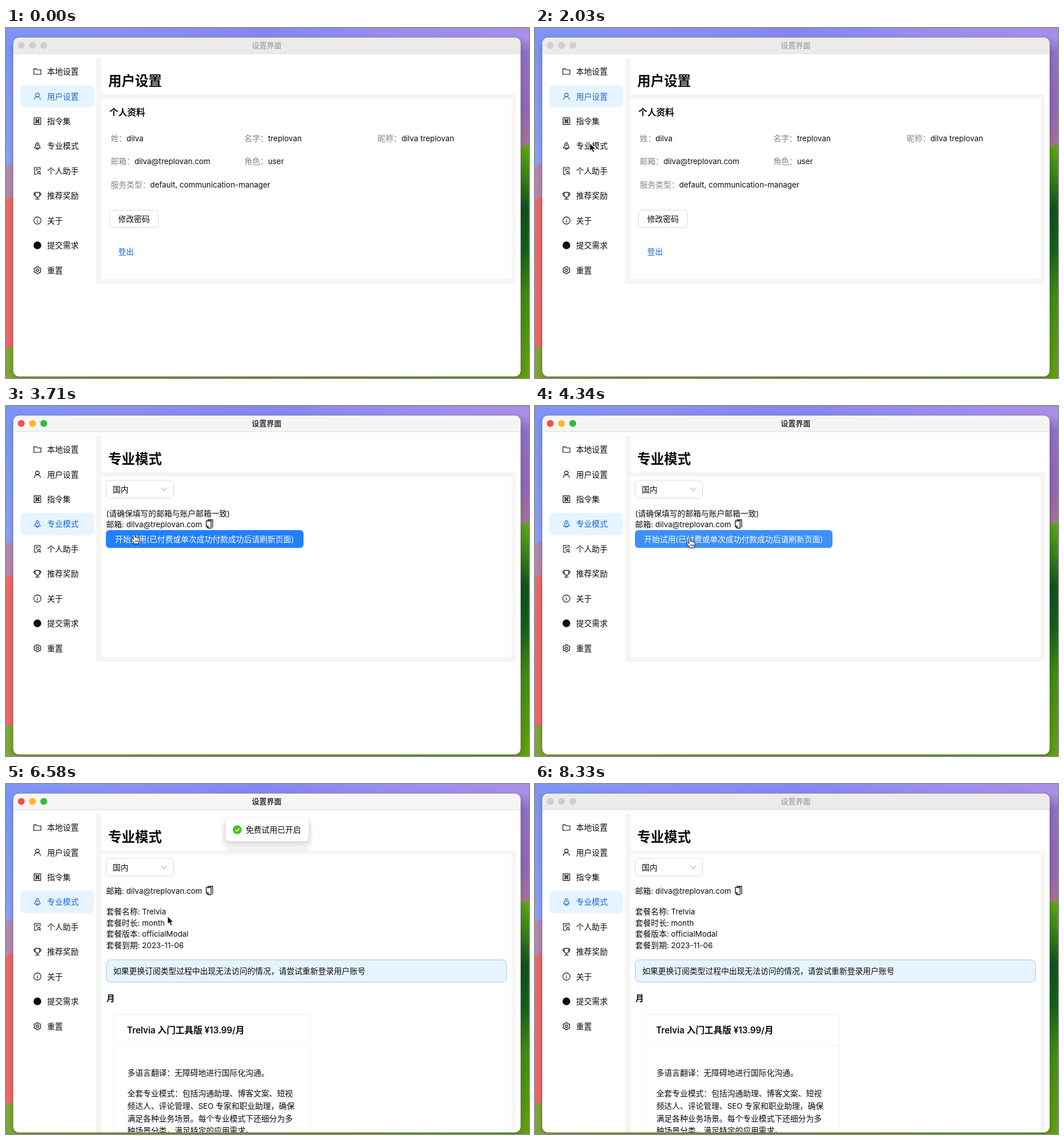
These frames come from a looping animation (916 by 612 pixels, 8400 ms). An HTML page:

```html
<!DOCTYPE html>
<html lang="zh-CN">
<head>
<meta charset="utf-8">
<style>
html, body { margin: 0; width: 100%; height: 100%; overflow: hidden; }
svg { display: block; }
text { font-family: Inter, "Noto Sans CJK SC", "Noto Sans CJK", sans-serif; }
.card { filter: drop-shadow(0 3px 4px rgba(0,0,0,.12)); }
.halo { filter: blur(2px); }
.window { filter: drop-shadow(0 3px 5px rgba(0,0,0,.25)); }
</style>
</head>
<body>
<svg id="stage" width="916" height="612" viewBox="0 0 916 612"></svg>
<script>
const LOOP = 8400, STEP = 70;
const INK = '#0c0c0c', BLUE = '#1569d6', GREY = '#858585', FRAME = '#f5f5f3';
const FIRST = 'dilva', LAST = 'treplovan', MAIL = `${FIRST}@${LAST}.com`, PLAN = 'Trelvia';

// Text placed by its left edge and vertical centre; Latin runs are set slightly smaller.
function text(x, cy, str, { size = 13.8, fill = INK, weight = 400, more = '' } = {}) {
  const body = str.replace(/[ -~¥]+/g, s => `<tspan font-size="${(size * 0.97).toFixed(2)}">${s}</tspan>`);
  return `<text x="${x}" y="${cy + size * 0.37}" font-size="${size}" font-weight="${weight}" fill="${fill}" xml:space="preserve" ${more}>${body}</text>`;
}
const rect = (x, y, w, h, fill, more = '') =>
  `<rect x="${x}" y="${y}" width="${w}" height="${h}" fill="${fill}" ${more}/>`;
const circle = (x, y, r, more = '') => `<circle cx="${x}" cy="${y}" r="${r}" ${more}/>`;
const path = (d, more = '') => `<path d="${d}" ${more}/>`;
const grad = (id, dir, stops) => `<linearGradient id="${id}" x2="${dir === 'x' ? 1 : 0}" y2="${dir === 'y' ? 1 : 0}">` +
  stops.map(([o, c]) => `<stop offset="${o}" stop-color="${c}"/>`).join('') + '</linearGradient>';

function gear() {
  let d = '';
  for (let i = 0; i < 24; i++) {
    const a = (Math.floor(i / 4) + [-0.2, 0.2, 0.34, 0.66][i % 4]) * Math.PI / 3 - Math.PI / 2;
    const r = i % 4 < 2 ? 6.4 : 5;
    d += `${i ? 'L' : 'M'}${(r * Math.cos(a)).toFixed(2)} ${(r * Math.sin(a)).toFixed(2)}`;
  }
  return path(d + 'Z') + circle(0, 0, 2.1);
}

const loop = (sx, sy) => circle(sx * 2.2, sy * 2.2, 1.1);
const menu = [
  ['本地设置', path('M-6.2-4.6h4.4l1.7 1.8h6.3v7.8h-12.4z')],
  ['用户设置', circle(0, -2.4, 3.1) + path('M-5.3 6.2c0-7.4 10.6-7.4 10.6 0')],
  ['指令集', rect(-5.8, -5.8, 11.6, 11.6, 'none') + rect(-1.2, -1.2, 2.4, 2.4, 'none') +
    loop(-1, -1) + loop(1, -1) + loop(-1, 1) + loop(1, 1)],
  ['专业模式', path('M0-6.3C2.4-4.6 3.2-2.6 3.2 0L4.8 2.2V3.6H-4.8V2.2L-3.2 0C-3.2-2.6-2.4-4.6 0-6.3zM-1.7 3.8C-1.7 6.8 1.7 6.8 1.7 3.8') + circle(0, -1.4, .7)],
  ['个人助手', path('M4.8-1V-6H-5V6H0M-2.6-3.2h5M-2.6-.6h2.4M4.2 4.6L6 6.3') + circle(2.7, 3, 2.1)],
  ['推荐奖励', path('M-3.8-5.8H3.8V-.5C3.8 3.6-3.8 3.6-3.8-.5zM-3.8-4.4H-6v1.6Q-6-.4-3.8-.4M3.8-4.4H6v1.6Q6-.4 3.8-.4M0 2.8V5.8M-3.6 5.9H3.6')],
  ['关于', circle(0, 0, 6.3) + path('M0-.8V3.6M0-3.4v1.2')],
  ['提交需求', circle(0, 0, 6.2, 'fill="currentColor"')],
  ['重置', gear()]
];
const rowY = i => 76 + i * 43.44;
const menuItem = ([label, icon], i) =>
  `<g id="item${i}" color="${INK}"><g transform="translate(55 ${rowY(i)})" fill="none" stroke="currentColor" stroke-width="1.15" stroke-linejoin="round">${icon}</g>` +
  text(72, rowY(i), label, { fill: 'currentColor' }) + '</g>';
const highlight = i => rect(25, Math.round(rowY(i) - 19.4), 129, 39, '#e6f4ff', `rx="8" id="mark${i}"`);

const heading = s => text(179, 92, s, { size: 23.5, weight: 700 });
const copyIcon = y => path(`M350.8 ${y - 5}h8.4v12.6h-5.2l-3.2-3.2zM351 ${y + 4.2}h3.2v3.2M353 ${y - 7}h9v13.4`,
  'fill="none" stroke="#111" stroke-width="1.3"');
const field = (x, y, label, value) =>
  text(x, y, label + '：', { fill: GREY }) + text(x + (label.length + 1) * 13.8, y, value);
const mailLine = y => text(175.5, y, '邮箱: ' + MAIL) + copyIcon(y - 1);

const userPage = heading('用户设置') + text(181, 147.5, '个人资料', { size: 15.7, weight: 700 }) +
  field(183.5, 192.5, '姓', FIRST) + field(417.5, 192.5, '名字', LAST) + field(651, 192.5, '昵称', `${FIRST} ${LAST}`) +
  field(183.5, 233, '邮箱', MAIL) + field(417.5, 233, '角色', 'user') +
  field(183.5, 273.5, '服务类型', 'default, communication-manager') +
  rect(181, 318.5, 86, 30.5, '#fff', 'rx="6" stroke="#d9d9d9"') +
  text(196.5, 334, '修改密码') + text(196.5, 391, '登出', { fill: BLUE });

const proHead = heading('专业模式') + rect(175.5, 130, 118, 31, '#fff', 'rx="6" stroke="#d9d9d9"') +
  text(187, 146, '国内') + path('M272.5 143l4.5 5.5 4.5-5.5', 'fill="none" stroke="#bfbfbf" stroke-width="1.2"');

const trialPage = text(175.5, 187.5, '(请确保填写的邮箱与账户邮箱一致)') + mailLine(207) +
  rect(175, 219, 346, 31, '#e6f4ff', 'rx="6"') + rect(175, 217, 346, 31, '#1677ff', 'rx="6" id="trial"') +
  text(191, 232.7, '开始试用(已付费或单次成功付款成功后请刷新页面)', { fill: '#fff' });

const planPage = mailLine(187) +
  [['名称', PLAN], ['时长', 'month'], ['版本', 'officialModal'], ['到期', '2023-11-06']]
    .map(([k, v], i) => text(175.5, 222.8 + i * 19.7, `套餐${k}: ${v}`)).join('') +
  rect(175.5, 307.5, 701, 39, '#e6f4ff', 'rx="7.5" stroke="#a3cbee"') +
  text(188, 327.2, '如果更换订阅类型过程中出现无法访问的情况，请尝试重新登录用户账号') +
  text(176, 375, '月', { size: 14.5, weight: 700 }) +
  rect(188.5, 402.5, 344, 260, '#fff', 'rx="7" stroke="#f0f0f0"') + rect(189, 457, 343, 1, '#f0f0f0') +
  text(212, 430.3, PLAN + ' 入门工具版 ¥13.99/月', { size: 15.7, weight: 600 }) +
  [[505.3, '多语言翻译：无障碍地进行国际化沟通。'],
   [541, '全套专业模式：包括沟通助理、博客文案、短视'],
   [562.7, '频达人、评论管理、SEO 专家和职业助理，确保'],
   [584.4, '满足各种业务场景。每个专业模式下还细分为多'],
   [606, '种场景分类，满足特定的应用需求。']].map(([y, s]) => text(212.5, y, s)).join('');

const toast = rect(378, 60, 158, 57, '#000', 'rx="18" opacity=".05" class="halo"') +
  rect(385, 60, 145, 40, '#fff', 'rx="8" class="card"') + circle(405, 80, 7.8, 'fill="#4fc01f"') +
  path('M401.6 80.2l2.5 2.6 4.4-5', 'fill="none" stroke="#fff" stroke-width="1.4"') + text(420, 80, '免费试用已开启');

const wallpaper = rect(0, 0, 916, 612, 'url(#sky)') +
  rect(0, 16, 40, 596, 'url(#side)') + path('M0 242L40 222V282L0 302z', 'fill="#b488b0"') +
  path('M0 300L40 284V612H0z', 'fill="#ee686a"') + path('M0 560L40 548V612H0z', 'fill="#7fa637"') +
  rect(880, 18, 36, 200, 'url(#dusk)') + path('M880 216L916 202V612H880z', 'fill="url(#hill)"') +
  rect(20, 606, 870, 6, 'url(#ground)');

const lights = ['#f5504a', '#fdb927', '#2bbd3e'];
const $ = id => document.getElementById(id);

$('stage').innerHTML = '<defs>' +
  grad('sky', 'x', [[0, '#7b95f7'], [.2, '#8a90f4'], [.5, '#8587f2'], [.75, '#9a8eee'], [1, '#a98fe6']]) +
  grad('side', 'y', [[0, '#7b95f7'], [.38, '#8ba0f2'], [1, '#8ba0f2']]) +
  grad('dusk', 'y', [[0, '#a48fe0'], [.12, '#9070c8'], [.65, '#9166b6'], [1, '#b0748f']]) +
  grad('hill', 'y', [[0, '#62a814'], [.12, '#3c8a18'], [.28, '#0f521d'], [.45, '#13601c'], [.65, '#3f8d12'], [1, '#62a00f']]) +
  grad('ground', 'x', [[0, '#7fa637'], [.5, '#6f9c2c'], [1, '#62a00f']]) +
  `<clipPath id="win">${rect(13, 17, 888, 592, '#fff', 'rx="10"')}</clipPath></defs>` +
  wallpaper + rect(12.5, 16.5, 889, 593, '#fff', 'rx="10.5" stroke="#000" stroke-opacity=".16" class="window"') +
  '<g clip-path="url(#win)">' + rect(13, 17, 888, 592, '#fff') +
  rect(13, 17, 888, 28, '#f6f5f4', 'id="bar"') + rect(13, 44.5, 888, 1, '#dddcda') +
  lights.map((c, i) => circle(26.7 + i * 19.7, 30.5, 6, `id="light${i}"`)).join('') +
  text(430.5, 30, '设置界面', { size: 13, weight: 700, fill: 'currentColor', more: 'id="title"' }) +
  highlight(1) + highlight(3) + menu.map(menuItem).join('') +
  rect(158, 52, 735, 395, FRAME, 'id="frame"') + rect(167, 52, 726, 63.5, '#fff') +
  rect(167, 123.5, 718.5, 315.5, '#fff', 'id="panel"') +
  `<g id="user">${userPage}</g><g id="pro">${proHead}<g id="offer">${trialPage}</g><g id="plan">${planPage}</g></g>` +
  `</g><g id="toast">${toast}</g><g id="cursor">` +
  path('M0 0V14.6L3.3 11.5 5.4 16.5 8 15.4 5.9 10.5H10.4z', 'id="arrow" fill="#000" stroke="#fff" stroke-width="1.1" stroke-linejoin="round"') +
  path('M-1.6 1.6C-1.6-.6 1.3-.6 1.4 1.6L1.8 6C2 4.8 4.4 5 4.4 6.6 4.8 5.6 6.8 6 6.9 7.4 7.3 6.6 9.2 7 9.2 8.6V11.5C9.2 13.5 8 14.5 7.8 17H0C-.4 14.5-3.6 12-5 9.4-5.6 8-3.8 7-2.6 8.4L-1.2 10zM2 11v3.4M4.3 11v3.4M6.6 11v3.4',
    'id="hand" fill="#fff" stroke="#000" stroke-width="1" stroke-linejoin="round"') + '</g>';

const clamp = v => Math.min(1, Math.max(0, v));
const ramp = (t, from, to) => clamp((t - from) / (to - from));
const ease = p => p * p * (3 - 2 * p);
const easeOut = p => 1 - (1 - p) ** 3;
const mix = (a, b, p) => 'rgb(' + a.map((v, i) => Math.round(v + (b[i] - v) * p)) + ')';
const show = (id, on) => { $(id).style.display = on ? '' : 'none'; };

const ENTER = 350, FOCUS = 2590, SWAP = 2660, CLICK = 4410, DONE = 4550, BLUR = 8330;
// Pointer stops: time, x, y.
const track = [
  [350, 419, 567], [490, 330, 470], [770, 330, 470], [980, 250, 380], [1190, 250, 380], [2030, 96, 201],
  [2170, 96, 201], [2450, 91, 204], [3430, 91, 204], [3850, 271, 231], [6510, 271, 231], [6580, 283, 231],
  [6790, 388, 287], [7070, 388, 287], [7350, 598, 373], [7490, 598, 373], [7980, 592, 622]
];

function pointer(t) {
  const i = track.findIndex(k => k[0] > t);
  if (i < 0) return track[track.length - 1].slice(1);
  if (!i) return track[0].slice(1);
  const [t0, x0, y0] = track[i - 1], [t1, x1, y1] = track[i];
  const p = ease(ramp(t, t0, t1));
  return [x0 + (x1 - x0) * p, y0 + (y1 - y0) * p];
}

const ink = [12, 12, 12], blue = [21, 105, 214];
const primary = [22, 119, 255], hover = [61, 143, 251], pressed = [9, 88, 217];

function draw(t) {
  const active = t >= FOCUS && t < BLUR;
  $('bar').setAttribute('fill', active ? '#f6f5f4' : '#ecebe9');
  $('title').setAttribute('color', active ? '#333' : '#afadab');
  lights.forEach((c, i) => $('light' + i).setAttribute('fill', active ? c : '#d1cfcd'));

  const sel = ease(ramp(t, FOCUS, FOCUS + 300));
  $('mark1').setAttribute('opacity', 1 - sel);
  $('mark3').setAttribute('opacity', sel);
  $('item1').setAttribute('color', mix(blue, ink, sel));
  $('item3').setAttribute('color', mix(ink, blue, sel));

  const plan = t >= DONE;
  show('user', t < SWAP);
  show('pro', t >= SWAP);
  show('offer', !plan);
  show('plan', plan);
  $('frame').setAttribute('height', plan ? 570 : 395);
  $('panel').setAttribute('height', plan ? 500 : 315.5);

  const [x, y] = pointer(t);
  $('trial').setAttribute('fill', t < CLICK
    ? mix(primary, hover, ramp(t, 3640, 3850))
    : mix(hover, pressed, ramp(t, CLICK - 70, CLICK + 130)));

  const enter = easeOut(ramp(t, 4550, 4850)), leave = ease(ramp(t, 7490, 7840));
  show('toast', enter > 0 && leave < 1);
  $('toast').setAttribute('opacity', enter * (1 - leave));
  $('toast').setAttribute('transform', `translate(0 ${-56 * (1 - enter)})`);

  const onMenu = t >= 2380 && x < 154 && y < 226, onTrial = x > 175 && y > 217 && t > FOCUS;
  const hand = t < DONE && (onMenu || onTrial);
  show('cursor', t >= ENTER && t < 7980);
  show('hand', hand);
  show('arrow', !hand);
  $('cursor').setAttribute('transform', `translate(${x} ${y})`);
}

const start = performance.now();
function tick() {
  const t = (performance.now() - start) % LOOP;
  draw(Math.floor(t / STEP) * STEP);
  requestAnimationFrame(tick);
}
draw(0);
requestAnimationFrame(tick);
</script>
</body>
</html>
```
